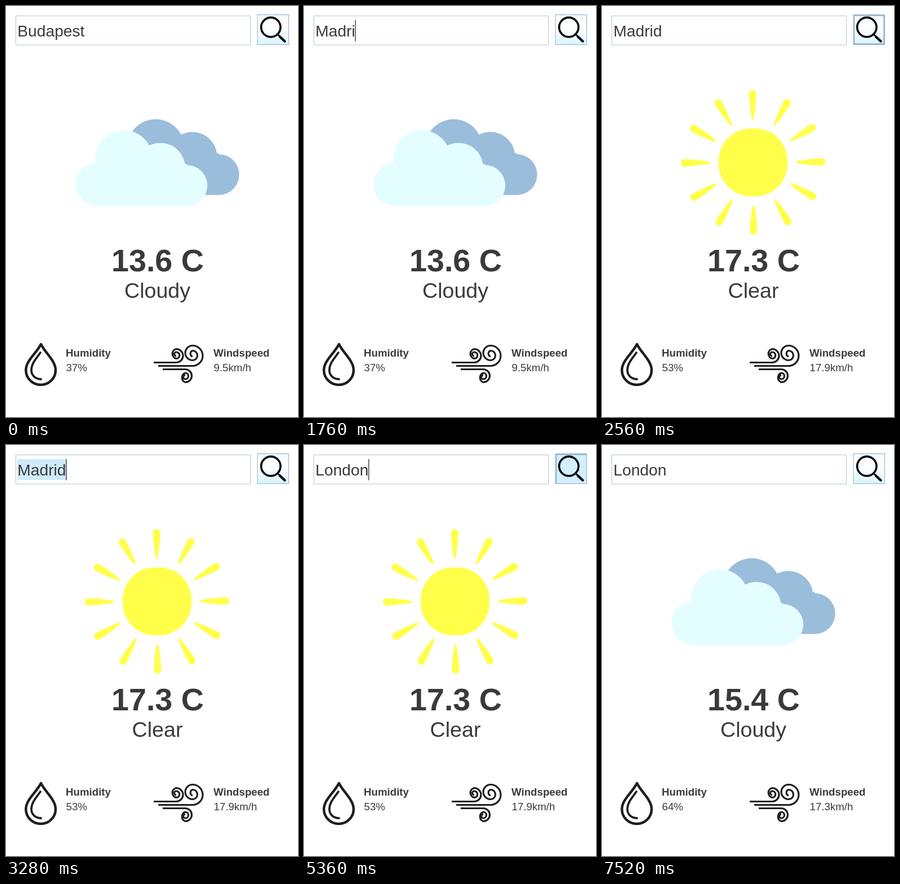
An HTML page that plays this animation: 518x728 px, repeating every 7.6 s.

```html
<!DOCTYPE html>
<html lang="en">
<head>
<meta charset="utf-8">
<title>Weather app</title>
<style>
html, body { margin: 0; width: 100%; height: 100%; overflow: hidden; background: #fff }
svg { display: block; font-family: "Liberation Sans", Arial, sans-serif; fill: #3a3a3a }
.b { font-weight: bold }
.mid { text-anchor: middle }
.small { font-size: 18.7px }
.line { fill: none; stroke: #1e1e1e; stroke-linecap: round; stroke-linejoin: round }
</style>
</head>
<body>
<svg width="518" height="728" viewBox="0 0 518 728">
  <defs>
    <linearGradient id="shade" x2="0" y2="1">
      <stop stop-color="#eff9fe"/>
      <stop offset=".3" stop-color="#fff"/>
      <stop offset=".5" stop-color="#fcfeff"/>
      <stop offset="1" stop-color="#d6f3fe"/>
    </linearGradient>
    <g id="puff">
      <circle cx="161" cy="316" r="38"/>
      <circle cx="209" cy="271" r="51"/>
      <circle cx="274" cy="286.500" r="44"/>
      <circle cx="321" cy="318" r="36.200"/>
      <path d="M161 280H321V354.200H161Z"/>
    </g>
    <path id="ray" d="M-1-76C-3-80-6-108-6.500-121Q-6-128 0-128Q6-128 6.500-121C6-108 3-80 1-76Z"/>
  </defs>

  <rect x="17.500" y="17.500" width="416" height="51.500" fill="#fff" stroke="#b0c6d0"/>
  <rect id="selection" x="20.300" y="25" height="37" fill="#cfebfa"/>
  <text id="city" x="20.300" y="53.700" font-size="28.200"></text>
  <rect id="caret" y="25" width="1.400" height="37.500"/>

  <rect id="button" x="446" y="15.500" width="55.500" height="53" stroke="#93adc2"/>
  <path id="bevel" fill="none" stroke="#8fabc4" stroke-width="1.500"/>
  <g class="line" style="stroke:#000">
    <circle cx="469.800" cy="37.600" r="17.200" stroke-width="3.600"/>
    <path d="M481.500 50L486 54" stroke-width="3"/>
    <path d="M486 54.500L494.500 62.500" stroke-width="4.400"/>
  </g>

  <g id="cloud">
    <use href="#puff" x="56.500" y="-19.400" fill="#9bbddc"/>
    <use href="#puff" fill="#e4feff"/>
  </g>
  <g id="sun" fill="#ffff4a">
    <rect x="207" y="217" width="122" height="120" rx="57"/>
  </g>

  <text id="temp" class="b mid" x="269" y="469.700" font-size="55.700"></text>
  <text id="sky" class="mid" x="268.500" y="516.700" font-size="37.600"></text>
  <text class="b small" x="106" y="621.300">Humidity</text>
  <text id="humidity" class="small" x="106.500" y="647"></text>
  <text class="b small" x="368" y="621.300">Windspeed</text>
  <text id="wind" class="small" x="368.500" y="647"></text>

  <g class="line">
    <path stroke-width="4.500" d="M62 599C55 614 35.300 628 35.300 645A26.300 26 0 0 0 88 645C88 628 69 614 62 599Z"/>
    <path stroke-width="3.800" d="M61 614C54 624 45 633 45 645C45 654 52 661 62 661"/>
    <path stroke-width="3.200" stroke-linecap="butt" d="M262 631.500H302A12 12 0 0 0 302 607.500A8.700 8.700 0 0 0 302 624.500A5.500 5.500 0 0 0 302 613A3.500 3.500 0 0 0 302 620
      M270 637.500H331A17.500 17.500 0 0 0 331 601.500A13 13 0 0 0 331 627.500A8.500 8.500 0 0 0 331 610.500A5.500 5.500 0 0 0 331 621
      M278 643.500H318A11.500 11.500 0 0 1 318 666.500A8.800 8.800 0 0 1 318 650A5.500 5.500 0 0 1 318 661A3.500 3.500 0 0 1 318 654"/>
  </g>
</svg>
<script>
const LOOP = 7600, LEFT = 20.3;
const $ = id => document.getElementById(id);

for (let i = 0; i < 12; i++) {
  const ray = document.createElementNS("http://www.w3.org/2000/svg", "use");
  ray.setAttribute("href", "#ray");
  ray.setAttribute("transform", `translate(268 277) rotate(${i * 30 - 0.4})`);
  $("sun").append(ray);
}

// Each track lists [start time, value] in order.
const typed = [
  [0, "Budapest"],
  [1040, "M"], [1200, "Ma"], [1280, "Mad"], [1600, "Madr"], [1760, "Madri"], [2000, "Madrid"],
  [4080, "L"], [4400, "Lo"], [4800, "Lon"], [4880, "Lond"], [5040, "Londo"], [5120, "London"]
];
const weather = [
  [0, ["13.6 C", "Cloudy", "37%", "9.5km/h"]],
  [2560, ["17.3 C", "Clear", "53%", "17.9km/h"]],
  [5520, ["15.4 C", "Cloudy", "64%", "17.3km/h"]]
];
const button = [
  [0, "idle"], [2240, "hover"], [2400, "pressed"], [2560, "hover"], [2640, "idle"],
  [5360, "pressed"], [5520, "idle"]
];
const caretOn = [[160, 800], [1040, 2560], [2960, 3840], [4080, 5520], [5920, 6480], [7040, 7520]];
const selected = [[320, 1040], [3280, 4080]];
const bevels = {
  idle: "",
  hover: "M447.500 17H500V67H447.500Z",
  pressed: "M447.500 68V17H501"
};

const at = (track, t) => track.findLast(([start]) => t >= start)[1];
const within = (spans, t) => spans.some(([from, to]) => t >= from && t < to);
const show = (id, on) => $(id).setAttribute("visibility", on ? "visible" : "hidden");

function draw(t) {
  $("city").textContent = at(typed, t);
  const width = $("city").getComputedTextLength();
  $("caret").setAttribute("x", LEFT + width - 0.2);
  $("selection").setAttribute("width", width);
  show("caret", within(caretOn, t));
  show("selection", within(selected, t));

  const mode = at(button, t);
  $("button").setAttribute("fill", mode == "pressed" ? "#d3eefe" : "url(#shade)");
  $("bevel").setAttribute("d", bevels[mode]);

  const report = at(weather, t);
  ["temp", "sky", "humidity", "wind"].forEach((id, i) => $(id).textContent = report[i]);
  show("sun", report[1] == "Clear");
  show("cloud", report[1] == "Cloudy");
}

const begin = performance.now();
function tick() {
  draw((performance.now() - begin) % LOOP);
  requestAnimationFrame(tick);
}
tick();
</script>
</body>
</html>
```
